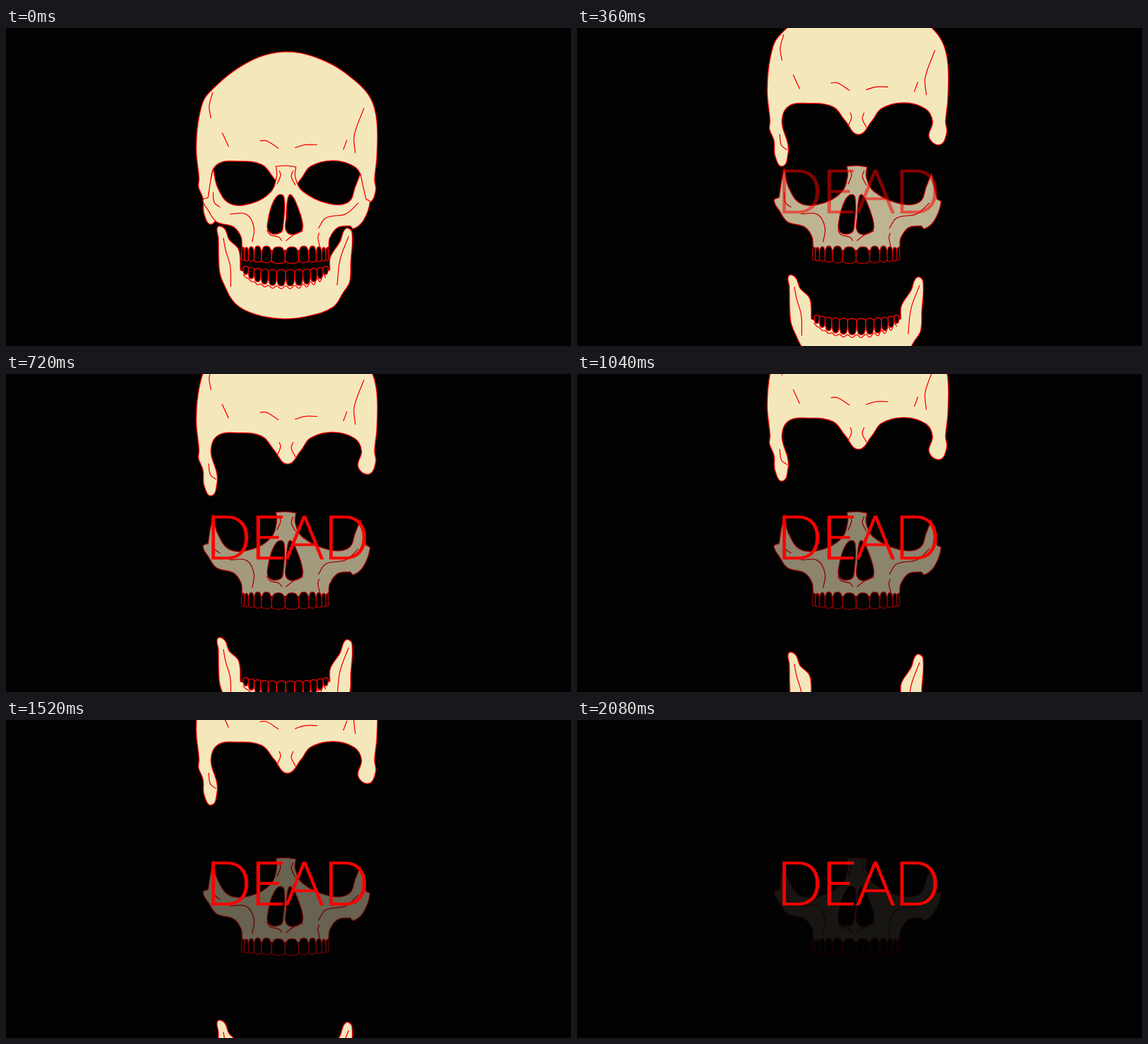
An HTML page for the animation above (2.12 s loop, 998 px wide and 561 px high).

```html
<!DOCTYPE html>
<html lang="en">
<head>
<meta charset="utf-8">
<title>Dead</title>
<style>
  html, body { margin: 0; width: 100%; height: 100%; overflow: hidden; background: #020202; }
  svg { display: block; width: 998px; height: 561px; }
  path { fill: none; stroke: #f00; stroke-width: 1.6; stroke-linecap: round; stroke-linejoin: round; }
  .bone { fill: #f4e7bc; }
  .hole { fill: #020202; }
  text { font: 300 108px Lato, Inter, sans-serif; letter-spacing: -2.5px; fill: #f00; stroke: #f00; stroke-width: 0.6px; }
</style>
</head>
<body>
<svg viewBox="0 0 998 561">
  <g id="jaw"></g>
  <g id="cranium"></g>
  <g id="face"></g>
  <text id="word" x="352" y="326.5">DEAD</text>
</svg>
<script>
const $ = id => document.getElementById(id);
const jaw = $('jaw'), cranium = $('cranium'), face = $('face'), word = $('word');

// Smooth curve through "x,y" points; a leading "!" marks a sharp corner.
function curve(text, closed) {
  const pts = text.trim().split(/\s+/).map(s => {
    const [x, y] = s.replace('!', '').split(',').map(Number);
    return { x, y, sharp: s[0] === '!' };
  });
  const n = pts.length;
  const at = i => closed ? pts[(i + n) % n] : pts[Math.max(0, Math.min(n - 1, i))];
  const dir = (a, b) => {
    const dx = b.x - a.x, dy = b.y - a.y, len = Math.hypot(dx, dy) || 1;
    return [dx / len, dy / len];
  };
  let d = `M${pts[0].x},${pts[0].y}`;
  for (let i = 0; i < (closed ? n : n - 1); i++) {
    const a = at(i), b = at(i + 1);
    const h = Math.hypot(b.x - a.x, b.y - a.y) * 0.36;
    const u = dir(a.sharp ? a : at(i - 1), b);
    const v = dir(a, b.sharp ? b : at(i + 2));
    d += `C${a.x + u[0] * h},${a.y + u[1] * h} ${b.x - v[0] * h},${b.y - v[1] * h} ${b.x},${b.y}`;
  }
  return closed ? d + 'Z' : d;
}

function draw(group, text, kind) {
  const p = document.createElementNS('http://www.w3.org/2000/svg', 'path');
  p.setAttribute('d', curve(text, !!kind));
  if (kind) p.setAttribute('class', kind);
  group.append(p);
}
const lines = (group, list) => list.forEach(t => draw(group, t));

// A rounded root that widens towards the biting edge.
function tooth(group, { l, r, root, edge }) {
  const at = (u, v) => `${l + (r - l) * u},${root + (edge - root) * v}`;
  draw(group, [at(0.5, 0), at(0.85, 0.12), at(1, 0.7), at(0.88, 0.97),
    at(0.12, 0.97), at(0, 0.7), at(0.15, 0.12)].join(' '), 'hole');
}

// Six teeth on each side of a centre line, listed from left to right.
function row(centre, width, root, edge) {
  const all = [];
  for (let i = 0, x = 0; i < 6; x += width(i++)) {
    const y = { root: root(i), edge: edge(i) };
    all.unshift({ l: centre - x - width(i), r: centre - x, ...y });
    all.push({ l: centre + x, r: centre + x + width(i), ...y });
  }
  return all;
}
const upper = row(493, i => 24 * 0.74 ** i, i => 386 - 1.5 * Math.sin(i), i => 414.5 - i);
const lower = row(494, i => 16 - 1.4 * i, i => 455 - 0.8 * i * i, i => 427 - 0.25 * i * i);

const bridge = ['483,252 485,260 479,275', '507,252 504,262 511,277'];

draw(cranium, `497,42 565,59 620,96 645,126 655,165 655,228 651,267 653,287 641,308 622,295
  628,267 616,245 578,234 538,244 521,266 497,290 474,266 452,241 410,235 374,240 362,267
  372,305 373,322 363,346 350,328 348,301 340,280 341,266 336,212 342,152 357,116 430,59`, 'bone');
lines(cranium, [
  ...bridge,
  '365,114 359,138 362,159',
  '382,185 393,209',
  '449,199 460,199 481,212',
  '511,211 528,206 549,206',
  '632,142 615,190 617,220',
  '602,198 596,214',
  '358,290 361,309 371,317'
]);

draw(face, `!477,244 494,243 !512,245 511,263 524,288 570,310 605,307 617,280 !626,257 632,285
  !636,302 643,307 631,340 614,354 !608,349 586,352 572,370 !570,386 !560,392 !430,392
  !417,386 415,368 402,351 372,342 358,323 348,304 !357,299 361,272 !366,248 374,282
  396,310 435,309 468,289 478,262`, 'bone');
draw(face, '487,294 492,308 490,345 485,361 465,360 463,338 474,303', 'hole');
draw(face, '503,294 513,310 524,345 520,360 497,361 495,332 498,300', 'hole');
lines(face, [
  ...bridge,
  '366,290 368,308 378,316',
  '396,328 425,329 438,352 435,377',
  '622,309 600,328 565,335 552,353',
  '553,362 551,370 554,385',
  '461,357 467,365 482,369 487,375',
  '495,375 508,365 524,358'
]);
upper.forEach(t => tooth(face, t));

draw(jaw, `374,351 386,354 394,373 411,391 !414,427 447,440 491,443 538,441 !572,427 573,404
  590,377 600,354 611,360 609,414 607,448 596,466 578,492 535,508 490,513 440,505 405,486
  384,450 377,428 375,370`, 'bone');
lines(jaw, [
  '384,371 388,392 396,420 397,456',
  '605,368 590,409 585,453',
  lower.map(({ l, r, root }) => `${l},${root} ${(l + r) / 2},${root + 5}`).join(' ')
]);
lower.forEach(t => tooth(jaw, t));

const LOOP = 2120, STEP = 40;
const clamp = v => Math.max(0, Math.min(1, v));

// A quick burst, a slow steady drift, then a quick exit.
function pose(t) {
  const burst = 1 - (1 - clamp(t / 320)) ** 3;
  const exit = clamp((t - 1760) / 320) ** 2;
  const drift = 0.081 * t + 130 * exit;
  cranium.setAttribute('transform', `translate(0 ${-(73 * burst + drift)})`);
  jaw.setAttribute('transform', `translate(0 ${57 * burst + drift})`);
  face.setAttribute('opacity', 1 - 0.11 * burst - 0.00031 * t - 0.16 * exit);
  word.setAttribute('opacity', clamp((t - 200) / 300));
}

const start = performance.now();
function tick() {
  const t = (performance.now() - start) % LOOP;
  pose(Math.floor(t / STEP) * STEP);
  requestAnimationFrame(tick);
}
tick();
</script>
</body>
</html>
```
